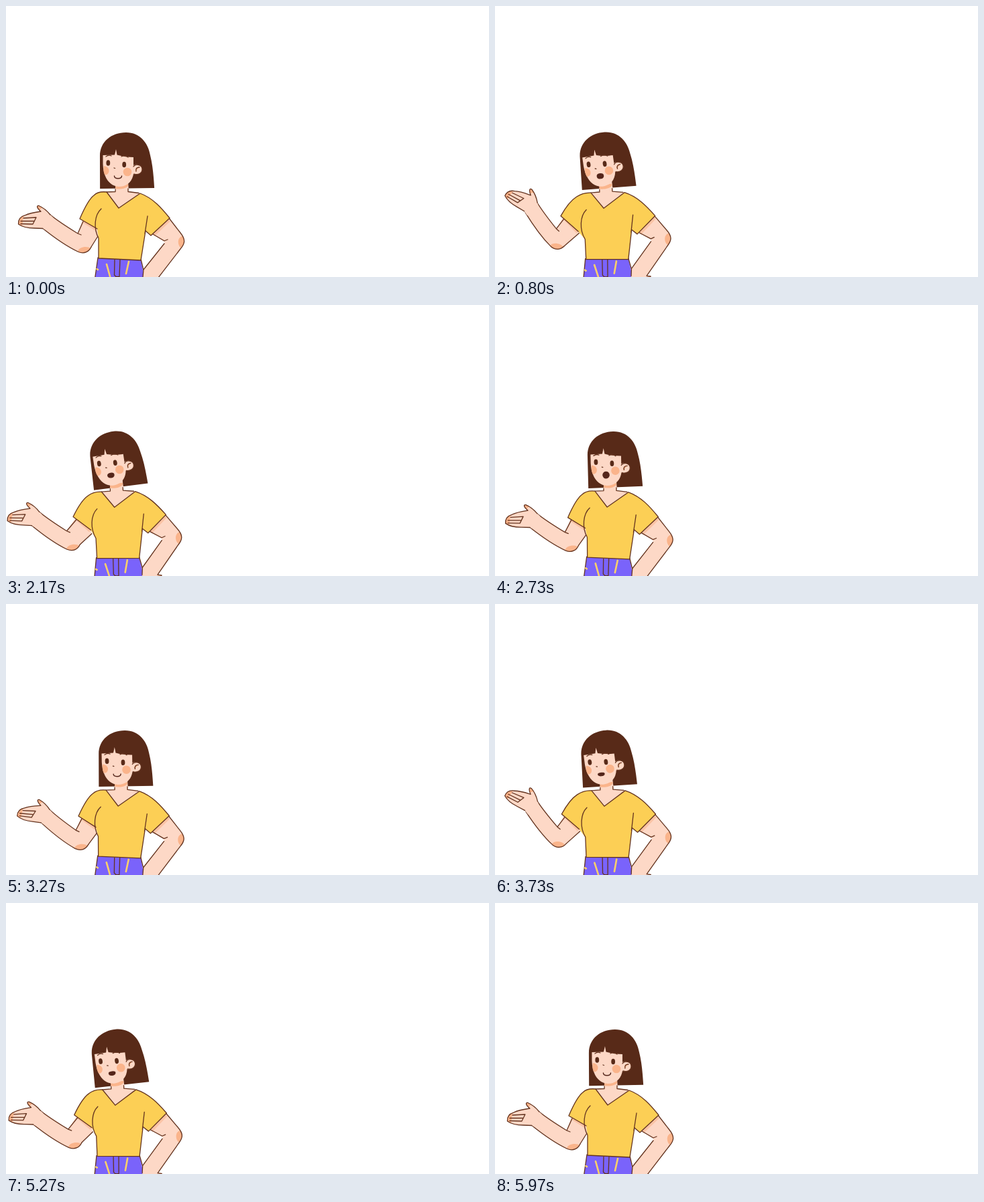
Recreate the animation shown at these times as an HTML page. Size 720 by 405 pixels, loop 6010 ms.

```html
<!DOCTYPE html>
<html lang="en">
<head>
<meta charset="utf-8">
<title>Talking woman</title>
<style>
  html, body { margin: 0; width: 100%; height: 100%; overflow: hidden; background: #fff; }
  svg { display: block; width: 720px; height: 405px; }
  .line { fill: none; stroke: #63331f; stroke-width: 1.3; stroke-linecap: round; stroke-linejoin: round; }
  .skin { fill: #fdd8c6; }
  .warm { fill: #fab48b; }
  .dark { fill: #582a18; }
  .shirt { fill: #fccf55; }
  .shade { fill: none; stroke: #fbc3a5; stroke-width: 5; }
  .seam { fill: none; stroke: #fbd06a; stroke-width: 2.6; stroke-linecap: round; }
</style>
</head>
<body>
<svg viewBox="0 0 720 405">
  <path id="hair" class="dark" d="M140 273V224C140 203 157 189 179 189C200 189 212 205 215 223C219 239 220 256 221 272Z"/>

  <g id="torso">
    <!-- raised arm -->
    <path id="upper" class="skin"/>
    <path id="cuff" class="shade"/>
    <path id="upperLine" class="line"/>
    <g id="fore">
      <path class="skin" d="M66 312L107 340L117 342L127 360C124 367 117 371 108 367.500C90 359 73 347 55 332.500Z"/>
      <path class="warm" d="M107 367C108 360 121 358 126 362C122 369 115 371 107 367Z"/>
      <path class="line" d="M66 312C78 322 94 332 107 340L112 342M127 360C124 367 117 371 108 367.500C90 359 73 347 55 332.500"/>
      <g id="hand">
        <path class="skin" d="M67 313C62 307 57 302 49 298.500C45 298 46 302 52 307C45 308 36 309 28 313C21 315 18 319 18.500 326C24 330 34 332 42 332L56 333L62 336L70 316Z"/>
        <path class="warm" d="M28 313C21 315 18 319 18.500 326L24 328.500L26 314ZM49 298.500C45 298 46 302 50 305L54 301Z"/>
        <path class="line" d="M66 312C62 307 57 302 49 298.500C45 298 46 302 52 307C45 308 36 309 28 313C21 315 18 319 18.500 326C24 330 34 332 42 332L55 332.500M26 317L45 316L40 326M22 321.500L42 321.500M22 325.500L40 326"/>
      </g>
    </g>

    <!-- trousers -->
    <path fill="#7a63fb" d="M137 376L131 418H208L201 378Z"/>
    <path class="line" d="M137 376L131 418M201 378L205 395"/>
    <path class="seam" d="M150 386L155.500 406M183 382L179 400M135.500 393L137 394"/>
    <path class="line" d="M162 379L161.500 402L164 404.500H169L170 379"/>

    <!-- arm on the hip -->
    <path class="skin" d="M243 317L260 339C268 349 267 355 260 363L228 405L234 408L230 416H203L205 394L237 353L217 340Z"/>
    <path class="shade" d="M220 342L243 320"/>
    <path class="warm" d="M263.500 344C255 345 255 358 261 361.500C267 354 267 350 263.500 344ZM224 409L232 406L234 409L229 414Z"/>
    <path class="line" d="M243 317L260 339C268 349 267 355 260 363L227 406L233 407L229 414M204 405L205 394L236 355M219 341L236 351L241 349"/>

    <!-- neck and shirt -->
    <path class="skin" d="M163 262V277L150 279L168 303L200 280L183 277L182 262Z"/>
    <path class="warm" d="M163 268L182 266V269C177 274 169 274 163 273Z"/>
    <path class="line" d="M163 274V277.500L150 278M182 273V277.500L198 279.500"/>
    <path id="shirt" class="shirt"/>
    <path id="shirtLine" class="line"/>
    <path class="line" d="M142 303C132 312 130 332 138 347V377L201 380L208 336M211 314L207 340"/>
  </g>

  <g id="face">
    <path class="skin" d="M144.500 223L162 222.500L164 214L165.500 222.500C174 225 183 226 190 226V238C195 235 203 238 203 244C203 250 197 253 190 251C188 263 180 270 168 270C154 269 145 256 144.500 236Z"/>
    <path class="warm" d="M146 239C152 240 154 244 153.500 247C153 251 150 253 147 252C145 247 145 243 146 239Z"/>
    <circle class="warm" cx="181" cy="248" r="6.300"/>
    <path class="warm" d="M193 248C192 243 195 240 199 241L195 245Z"/>
    <path class="line" d="M190 240C193 235 203 237 203 244C203 250 197 253 191 251M194 247C193 243 195 241 199 241M149 225Q153 222 157 224M172 225Q177 222 182 226M161 242L162.500 242.500"/>
    <ellipse class="dark" cx="152.300" cy="234.500" rx="2.900" ry="4.300"/>
    <ellipse class="dark" cx="176.200" cy="237" rx="2.900" ry="4.300"/>
    <path id="mouth" fill="#54261b" stroke="#54261b" stroke-width="1.400" stroke-linejoin="round" transform="translate(167 254)"/>
  </g>
</svg>
<script>
const CYCLE = 3005;
const $ = id => document.getElementById(id);
const set = (id, name, value) => $(id).setAttribute(name, value);

// Eased interpolation through [time, value, ...] rows
function track(rows, t) {
  const i = Math.max(1, rows.findIndex(row => row[0] >= t));
  const [a, b] = [rows[i - 1], rows[i]];
  const k = (t - a[0]) / (b[0] - a[0]);
  const s = k * k * (3 - 2 * k);
  return a.slice(1).map((v, n) => v + (b[n + 1] - v) * s);
}

const REACH = [[0, 0], [1000, 23], [1600, 21], [CYCLE, 0]];
const RAISE = [[0, 0], [1000, 22], [2400, -1], [CYCLE, 0]];
// half width, upper lip, lower lip
const MOUTH = [
  [0, 5.5, 5, 5], [560, 5.5, 5, 5], [730, 4.6, -2, 3.5], [810, 4.6, -4.5, 5],
  [980, 4.6, -6, 6], [1250, 4.6, -2, 4], [1500, 5.8, -1.5, 8], [1700, 5.8, -1.5, 8],
  [2000, 4.6, -5, 6], [2350, 4.6, -2, 4], [2650, 4.6, -6, 6.5], [2780, 4.6, -6, 6.5],
  [2940, 5.5, 5, 5], [CYCLE, 5.5, 5, 5]
];

const sway = t => (1 - Math.cos(2 * Math.PI * t / CYCLE)) / 2;

function draw(t) {
  const u = sway(t);
  const lean = 5 * u;
  const [reach] = track(REACH, t);
  const [raise] = track(RAISE, t);
  const bend = raise + lean;
  const dx = -reach, dy = -0.42 * reach;

  set('torso', 'transform', `rotate(${-lean} 170 425)`);
  // The hair swings a little after the face
  set('hair', 'transform', `translate(${-23.5 * u} ${-u}) rotate(${-9 * sway(t - 130)} 180 232)`);
  set('face', 'transform', `translate(${-18 * u} 0) rotate(${-15 * u} 167 255)`);
  set('fore', 'transform', `translate(${dx} ${dy}) rotate(${bend} 117 363)`);
  set('hand', 'transform', `rotate(${0.45 * raise} 61 321)`);

  // Joints of the upper arm follow the turning forearm
  const r = bend * Math.PI / 180, c = Math.cos(r), s = Math.sin(r);
  const joint = (x, y) => `${117 + dx + x * c - y * s} ${363 + dy + x * s + y * c}`;
  const lift = reach / 22;
  const cuffX = 110 - 7 * lift, cuffY = 318 - 8 * lift;
  const inX = 136 - 8 * lift, inY = 333 + 2 * lift;
  const crook = joint(-10, -23), elbow = joint(10, -3);
  const under = `${inX + 1} ${inY + 11 - 9 * lift}`;
  set('upper', 'd', `M${cuffX + 5} ${cuffY}L${crook}L${joint(0, 0)}L${elbow}L${under}V${inY - 10}Z`);
  set('cuff', 'd', `M${cuffX + 6} ${cuffY + 4}L${inX - 1} ${inY + 1}`);
  set('upperLine', 'd', `M${cuffX + 5} ${cuffY + 4}L${crook}M${elbow}L${under}`);

  const sleeve = `M168 302L150 278C141 277 135 279 ${131 - 3 * lift} 283`
    + `C${123 - 4 * lift} ${289 - lift} ${116 - 6 * lift} ${304 - 5 * lift} ${cuffX} ${cuffY}L${inX} ${inY}`;
  const right = 'L216 343L244 317C232 302 219 287 200 280L168 302';
  set('shirt', 'd', `${sleeve}L138 347V377L201 380L208 336${right}Z`);
  set('shirtLine', 'd', `${sleeve}M208 336${right}`);

  const [w, up, low] = track(MOUTH, t);
  set('mouth', 'd', `M${-w} 0C${-w} ${up} ${w} ${up} ${w} 0C${w} ${low} ${-w} ${low} ${-w} 0Z`);
}

function tick() {
  draw(performance.now() % CYCLE);
  requestAnimationFrame(tick);
}
tick();
</script>
</body>
</html>
```
